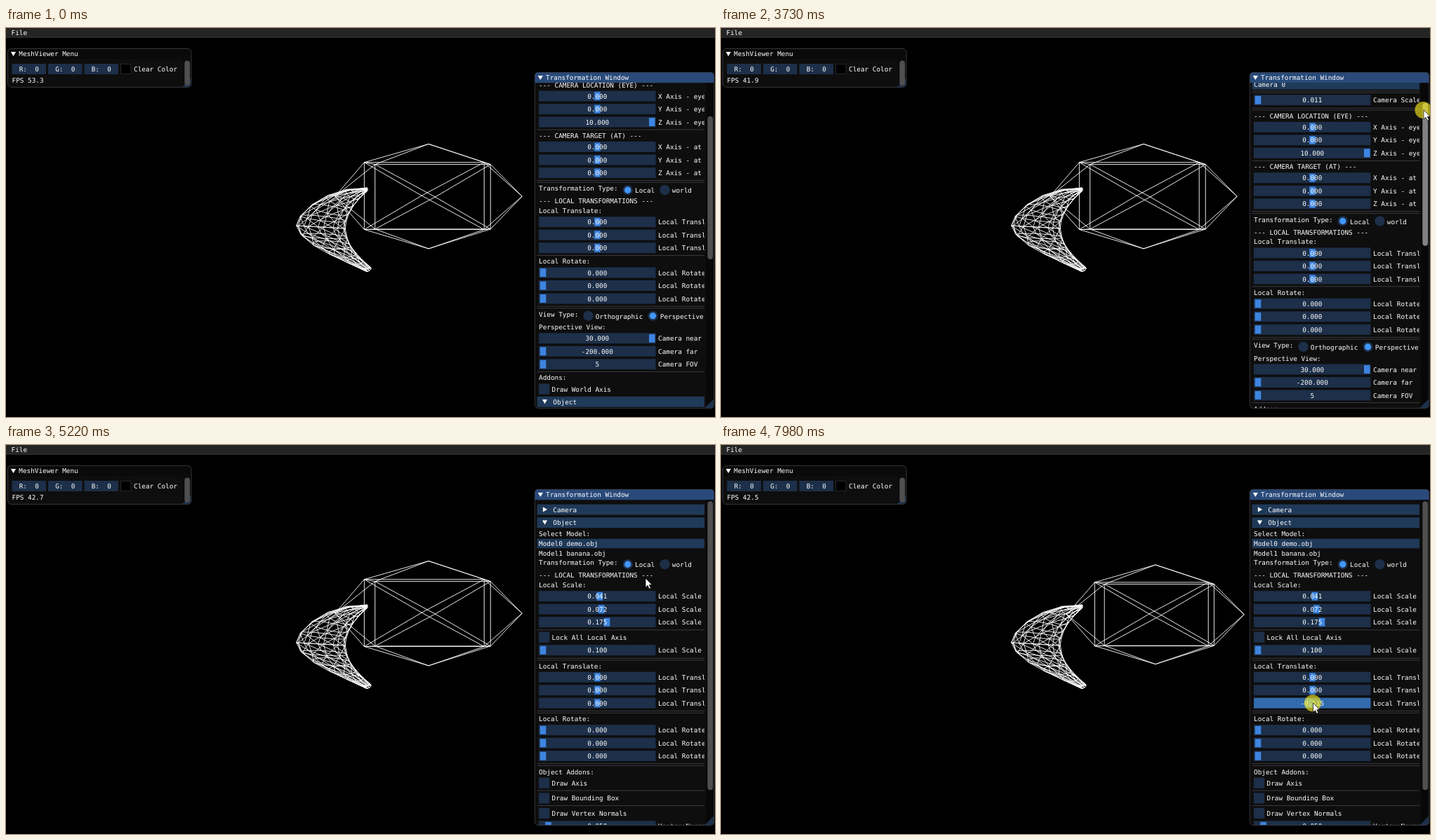
An HTML page that plays this animation: 1010x555 px, repeating every 8000 ms.

```html
<!DOCTYPE html>
<html lang="en">
<head>
<meta charset="utf-8">
<title>Mesh viewer</title>
<style>
html, body { margin: 0; width: 100%; height: 100%; overflow: hidden; background: #000; }
svg { display: block; }
text {
  font: 9.36px "DejaVu Sans Mono", monospace;
  fill: #fff;
  white-space: pre;
  text-rendering: geometricPrecision;
}
</style>
</head>
<body>
<svg id="stage" width="1010" height="555" viewBox="0 0 1010 555">
  <defs><clipPath id="inner"><rect x="754" y="78" width="241" height="464"/></clipPath></defs>
</svg>
<script>
const NS = 'http://www.w3.org/2000/svg';
const stage = document.getElementById('stage');
const LOOP = 8000;
const C = {
  frame: '#1d2f49', hover: '#24456d', active: '#316aad',
  header: '#1f3958', headerHot: '#387bcb', grab: '#3d85e0', grabHot: '#4296fa',
  line: '#3e3e47', win: '#0e0e0e', thumb: '#4f4f4f', thumbHot: '#828282', grip: '#1c304a'
};

function add(parent, tag, attrs) {
  const el = document.createElementNS(NS, tag);
  for (const k in attrs) el.setAttribute(k, attrs[k]);
  parent.appendChild(el);
  return el;
}
const rect = (p, x, y, width, height, fill, rx = 0) => add(p, 'rect', { x, y, width, height, fill, rx });
const path = (p, d, fill = '#fff') => add(p, 'path', { d, fill });
function label(p, x, cy, str, anchor = 'start') {
  const el = add(p, 'text', { x, y: cy + 3.4, 'text-anchor': anchor });
  el.textContent = str;
  return el;
}
const down = (x, y) => `M${x - 3.6} ${y - 3}h7.2l-3.6 6.2z`;
const right = (x, y) => `M${x - 2.6} ${y - 3.6}v7.2l6.2 -3.6z`;

// ---------- wireframes ----------
const mesh = add(stage, 'g', { fill: 'none', stroke: '#fff', 'stroke-width': 0.9 });
const solid = add(mesh, 'path', {});
const banana = add(mesh, 'path', {});

const seg = (a, b) => `M${a[0].toFixed(1)} ${a[1].toFixed(1)}L${b[0].toFixed(1)} ${b[1].toFixed(1)}`;

// box with a pyramid on each face
function solidPath(z) {
  const at = (x, y, w) => {
    const s = 1 / (1 - z * 0.1055 - w * 0.0185);
    return [930 + (x * 83.8 - 328) * s, 272 + (y * 47 - 31.8) * s];
  };
  const corners = [];
  for (let i = 0; i < 8; i++) corners.push([i & 1 ? 1 : -1, i & 2 ? 1 : -1, i & 4 ? 1 : -1]);
  let d = '';
  corners.forEach((c, i) => {
    for (let axis = 0; axis < 3; axis++) {
      const tip = [0, 0, 0];
      tip[axis] = c[axis] * 1.59;
      d += seg(at(...c), at(...tip));
      if (!(i & 1 << axis)) d += seg(at(...c), at(...corners[i | 1 << axis]));
    }
  });
  return d;
}

function bezier(p, t) {
  const u = 1 - t;
  const mix = k => u * u * u * p[k] + 3 * u * u * t * p[k + 2] + 3 * u * t * t * p[k + 4] + t * t * t * p[k + 6];
  return [mix(0), mix(1)];
}
const twoPart = (a, b, t) => t < 0.5 ? bezier(a, t * 2) : bezier(b, t * 2 - 1);

// curved tube between an outer and an inner outline
function bananaPath() {
  const outer = t => twoPart([514, 228, 462, 228, 413, 260, 413, 282], [413, 282, 413, 304, 470, 323, 513, 347], t);
  const inner = t => twoPart([514, 233, 495, 250, 484, 270, 484, 286], [484, 286, 486, 308, 500, 328, 520, 342], t);
  const rings = 10, sides = 10, v = [];
  for (let i = 0; i <= rings; i++) {
    const t = i / rings, o = outer(t), n = inner(t);
    const hx = (n[0] - o[0]) / 2, hy = (n[1] - o[1]) / 2, open = 0.5 * (1 - 2 * t);
    v.push(Array.from({ length: sides }, (_, j) => {
      const a = j / sides * 2 * Math.PI + 0.2, c = Math.cos(a), s = Math.sin(a) * open;
      return [(o[0] + n[0]) / 2 + hx * c + hy * s, (o[1] + n[1]) / 2 + hy * c - hx * s];
    }));
  }
  let d = '';
  for (let i = 0; i <= rings; i++) for (let j = 0; j < sides; j++) {
    const k = (j + 1) % sides;
    d += seg(v[i][j], v[i][k]);
    if (i < rings) d += seg(v[i][j], v[i + 1][j]) + seg(v[i][j], v[i + 1][k]);
  }
  return d + 'M505 228.5H515M506 230.5H514M507 343L519 342.5M509 345L518 343';
}
banana.setAttribute('d', bananaPath());

// ---------- menu bar and small window ----------
rect(stage, 0, 0, 1010, 13, '#242424');
rect(stage, 0, 12.8, 1010, 0.9, C.line);
label(stage, 7.5, 6.8, 'File');

function windowBox(x, y, w, h, titleFill, title) {
  rect(stage, x, y, w, h, C.win, 5);
  path(stage, `M${x} ${y + 15}V${y + 5}q0 -5 5 -5H${x + w - 5}q5 0 5 5V${y + 15}z`, titleFill);
  path(stage, down(x + 8, y + 7.6));
  label(stage, x + 15.8, y + 7.5, title);
}
function border(x, y, w, h) {
  add(stage, 'rect', { x, y, width: w, height: h, rx: 5, fill: 'none', stroke: C.line, 'stroke-width': 0.85 });
}

windowBox(2.5, 29.5, 261.5, 55, '#0a0a0a', 'MeshViewer Menu');
['R', 'G', 'B'].forEach((ch, i) => {
  const x = 8.5 + i * 51.5;
  rect(stage, x, 51, 48.5, 15, C.frame);
  label(stage, x + 24.3, 58.5, ch + ':  0', 'middle');
});
add(stage, 'rect', { x: 163.5, y: 51.5, width: 14.5, height: 14, fill: '#000', stroke: '#24262c' });
label(stage, 182, 58.5, 'Clear Color');
const fpsText = label(stage, 8.5, 74.8, '');
rect(stage, 252.5, 45, 11, 39, '#080808');
path(stage, 'M263.5 71.5V80q0 4 -4 4h-8.5z', C.grip);
rect(stage, 254.3, 46.5, 7.8, 35.5, C.thumb, 4);
border(2.5, 29.5, 261.5, 55);

// ---------- transformation window ----------
windowBox(753.3, 63.3, 255.4, 479.2, '#294a7a', 'Transformation Window');
const body = add(stage, 'g', { 'clip-path': 'url(#inner)' });
const top0 = add(body, 'g', {}), cam = add(body, 'g', {}), obj = add(body, 'g', {});
const hot = [];

function header(p, cy, str) {
  const el = rect(p, 756.5, cy - 7.3, 240, 15, C.header);
  hot.push({ el, p, cy, x: 756, w: 239, base: C.header, over: C.headerHot });
  const arrow = path(p, down(767.5, cy));
  label(p, 779.3, cy + 0.3, str);
  return arrow;
}
function slider(p, cy, value, name, knobX = 842.5) {
  const el = rect(p, 759, cy - 7.5, 166.5, 15, C.frame);
  const knob = rect(p, knobX - 4.3, cy - 5.9, 8.6, 11.9, C.grab);
  const text = label(p, 842.3, cy + 0.2, value, 'middle');
  label(p, 929, cy + 0.2, name);
  const it = { el, knob, text, p, cy, x: 759, w: 166.5, base: C.frame, over: C.hover };
  hot.push(it);
  return it;
}
const triple = (p, cy, value, name, x) => ['X', 'Y', 'Z'].map((a, i) =>
  slider(p, cy + i * 18.5, value, name.replace('#', a), x));
const rule = (p, ...ys) => ys.forEach(y => rect(p, 756.5, y - 0.4, 240, 0.9, C.line));
const note = (p, cy, str) => label(p, 759, cy, str);
function radio(p, cx, cy, str, on) {
  add(p, 'circle', { cx, cy, r: 7.2, fill: C.frame });
  if (on) add(p, 'circle', { cx, cy, r: 4.7, fill: C.grabHot });
  label(p, cx + 10.3, cy + 0.8, str);
}
function check(p, cy, str) {
  rect(p, 759, cy - 7.4, 15.2, 15.2, C.frame);
  label(p, 777.5, cy + 0.3, str);
}
function pick(p, cy, str, on) {
  if (on) rect(p, 756.5, cy - 6.8, 240, 13.6, C.header);
  note(p, cy, str);
}
function space(p, cy) {
  note(p, cy, 'Transformation Type:');
  radio(p, 885.7, cy + 2.2, 'Local', true);
  radio(p, 938.5, cy + 2.2, 'world');
  note(p, cy + 18, '--- LOCAL TRANSFORMATIONS ---');
}

const camArrow = header(top0, 92, 'Camera');

rect(cam, 759, 78, 62.5, 14.5, C.hover);
label(cam, 762.2, 85.3, 'Add Camera');
note(cam, 101, 'Select Camera:');
pick(cam, 115, 'Camera 0', true);
rule(cam, 124, 126.5);
slider(cam, 137, '0.011', 'Camera Scale', 765);
rule(cam, 148.5, 151.3);
note(cam, 159.8, '--- CAMERA LOCATION (EYE) ---');
triple(cam, 175.6, '0.000', '# Axis - eye').forEach((s, i) => {
  if (i < 2) return;
  s.text.textContent = '10.000';
  s.knob.setAttribute('x', 916);
});
rule(cam, 223.5);
note(cam, 231.8, '--- CAMERA TARGET (AT) ---');
triple(cam, 248, '0.000', '# Axis - at');
rule(cam, 295.8, 298.6);
space(cam, 307.5);
note(cam, 339.2, 'Local Translate:');
triple(cam, 355.2, '0.000', 'Local Translate #');
rule(cam, 403);
note(cam, 411.5, 'Local Rotate:');
triple(cam, 427.5, '0.000', 'Local Rotate #', 765);
rule(cam, 475.5, 478.3);
note(cam, 487.2, 'View Type:');
radio(cam, 829.5, 489.2, 'Orthographic');
radio(cam, 921.5, 489.2, 'Perspective', true);
note(cam, 505.4, 'Perspective View:');
slider(cam, 521.2, '30.000', 'Camera near', 920.3);
slider(cam, 539.7, '-200.000', 'Camera far', 765);
slider(cam, 558.2, '5', 'Camera FOV', 765);
rule(cam, 568.8);
note(cam, 577.5, 'Addons:');
check(cam, 593.3, 'Draw World Axis');

header(obj, 110.6, 'Object');
note(obj, 127, 'Select Model:');
pick(obj, 140.6, 'Model0 demo.obj', true);
pick(obj, 154.2, 'Model1 banana.obj');
space(obj, 168);
note(obj, 199.7, 'Local Scale:');
slider(obj, 215.7, '0.041', 'Local Scale X', 845.8);
slider(obj, 234.2, '0.072', 'Local Scale Y', 848.2);
slider(obj, 252.7, '0.175', 'Local Scale Z', 856);
rule(obj, 263.8);
check(obj, 274, 'Lock All Local Axis');
slider(obj, 292.7, '0.100', 'Local Scale all', 765);
rule(obj, 304.2, 307);
note(obj, 315.3, 'Local Translate:');
const moveZ = triple(obj, 331.2, '0.000', 'Local Translate #')[2];
rule(obj, 379.3, 382.2);
note(obj, 391, 'Local Rotate:');
triple(obj, 406.7, '0.000', 'Local Rotate #', 765);
rule(obj, 454.5, 457.5);
note(obj, 466.2, 'Object Addons:');
check(obj, 482, 'Draw Axis');
rule(obj, 493);
check(obj, 503.7, 'Draw Bounding Box');
rule(obj, 514.5);
check(obj, 525.2, 'Draw Vertex Normals');
slider(obj, 543.8, '0.050', 'Vertex Normals', 772.5);

rect(stage, 997, 78.5, 11, 463.5, '#080808');
path(stage, 'M1008 529.5V538q0 4 -4 4h-8.5z', C.grip);
const thumb = rect(stage, 999.3, 80, 7.8, 204, C.thumb, 4);
border(753.3, 63.3, 255.4, 479.2);

// ---------- pointer ----------
const pointer = add(stage, 'g', {});
const halo = add(pointer, 'circle', { r: 12, cx: -0.6, cy: 0.2, fill: '#f5e71c', opacity: 0.64 });
add(pointer, 'path', {
  d: 'M0 0V13.2L3 10.4L5.2 15.3L7.4 14.3L5.3 9.6H9.2Z',
  fill: '#fff', stroke: '#000', 'stroke-width': 0.7
});

// ---------- timeline: [ms, values...] ----------
const track = [
  [70, 946, 499], [870, 954, 446], [1200, 1000, 443], [1450, 1001, 440], [1700, 984, 431],
  [2100, 966, 300], [2520, 912, 168], [2800, 912, 168], [3360, 1001, 137], [3500, 1001, 136],
  [3910, 1001, 102], [4080, 1001, 63], [4180, 998, 72], [4400, 947, 95], [4590, 947, 96],
  [5010, 946, 97], [5650, 840, 379], [5850, 840, 379], [6130, 838, 368], [6900, 838, 368],
  [7140, 834.5, 367], [7400, 833, 367], [7700, 836, 368], [7980, 843.5, 368]
];
const depth = [[6869, 0], [6870, -0.5], [7140, -0.825], [7400, -1], [7700, -0.9], [7980, -0.515]];
const fps = [
  [0, 53.3], [770, 43.5], [1700, 42.4], [2200, 41.8], [2800, 42], [3360, 43], [3700, 41.9],
  [3850, 42.2], [4250, 42.3], [4550, 42.1], [5010, 42.4], [5400, 43.2], [6090, 43.1],
  [6610, 44.3], [6870, 44.3], [7140, 44.8], [7630, 44.2], [7700, 43.6], [7980, 42.5]
];

function sample(keys, t, k = 1) {
  if (t <= keys[0][0]) return keys[0][k];
  for (let i = 1; i < keys.length; i++) {
    const a = keys[i - 1], b = keys[i];
    if (t <= b[0]) return a[k] + (b[k] - a[k]) * (t - a[0]) / (b[0] - a[0]);
  }
  return keys[keys.length - 1][k];
}
const within = (t, a, b) => t >= a && t < b;
const shift = (g, y) => g.setAttribute('transform', `translate(0 ${y.toFixed(2)})`);

function draw(t) {
  const x = sample(track, t, 1), y = sample(track, t, 2);
  const dragBar = within(t, 3430, 4190), dragZ = t >= 6870, closed = t >= 4450;

  fpsText.textContent = 'FPS ' + sample(fps, Math.floor(t / 70) * 70).toFixed(1);

  let scroll = t < 3430 ? 104.5 : 0;
  if (dragBar) scroll = Math.max(0, Math.min(104.5, 104.5 - (136 - y) * 2.31));
  const off = new Map([[top0, -scroll], [cam, 26 - scroll], [obj, closed ? 0 : 527 - scroll]]);
  off.forEach((v, g) => shift(g, v));
  cam.setAttribute('display', closed ? 'none' : 'inline');
  camArrow.setAttribute('d', closed ? right(767.5, 92) : down(767.5, 92));
  thumb.setAttribute('y', 80.3 + scroll * 0.437);
  thumb.setAttribute('height', closed ? 412 : 204);
  thumb.setAttribute('fill', dragBar ? C.thumbHot : C.thumb);

  for (const h of hot) {
    const over = t > 4250 && x >= h.x && x < h.x + h.w && Math.abs(y - h.cy - off.get(h.p)) < 7.5;
    h.el.setAttribute('fill', over ? h.over : h.base);
  }

  const z = sample(depth, t);
  solid.setAttribute('d', solidPath(z));
  moveZ.text.textContent = z.toFixed(3);
  moveZ.knob.setAttribute('x', 838.2 + z * 7.75);
  moveZ.knob.setAttribute('fill', dragZ ? C.grabHot : C.grab);
  if (dragZ) moveZ.el.setAttribute('fill', C.active);

  pointer.setAttribute('display', t < 70 ? 'none' : 'inline');
  pointer.setAttribute('transform', `translate(${x.toFixed(2)} ${y.toFixed(2)})`);
  halo.setAttribute('display', dragBar || within(t, 4390, 4500) || dragZ ? 'inline' : 'none');
}

const start = performance.now();
function tick() {
  draw((performance.now() - start) % LOOP);
  requestAnimationFrame(tick);
}
tick();
</script>
</body>
</html>
```
